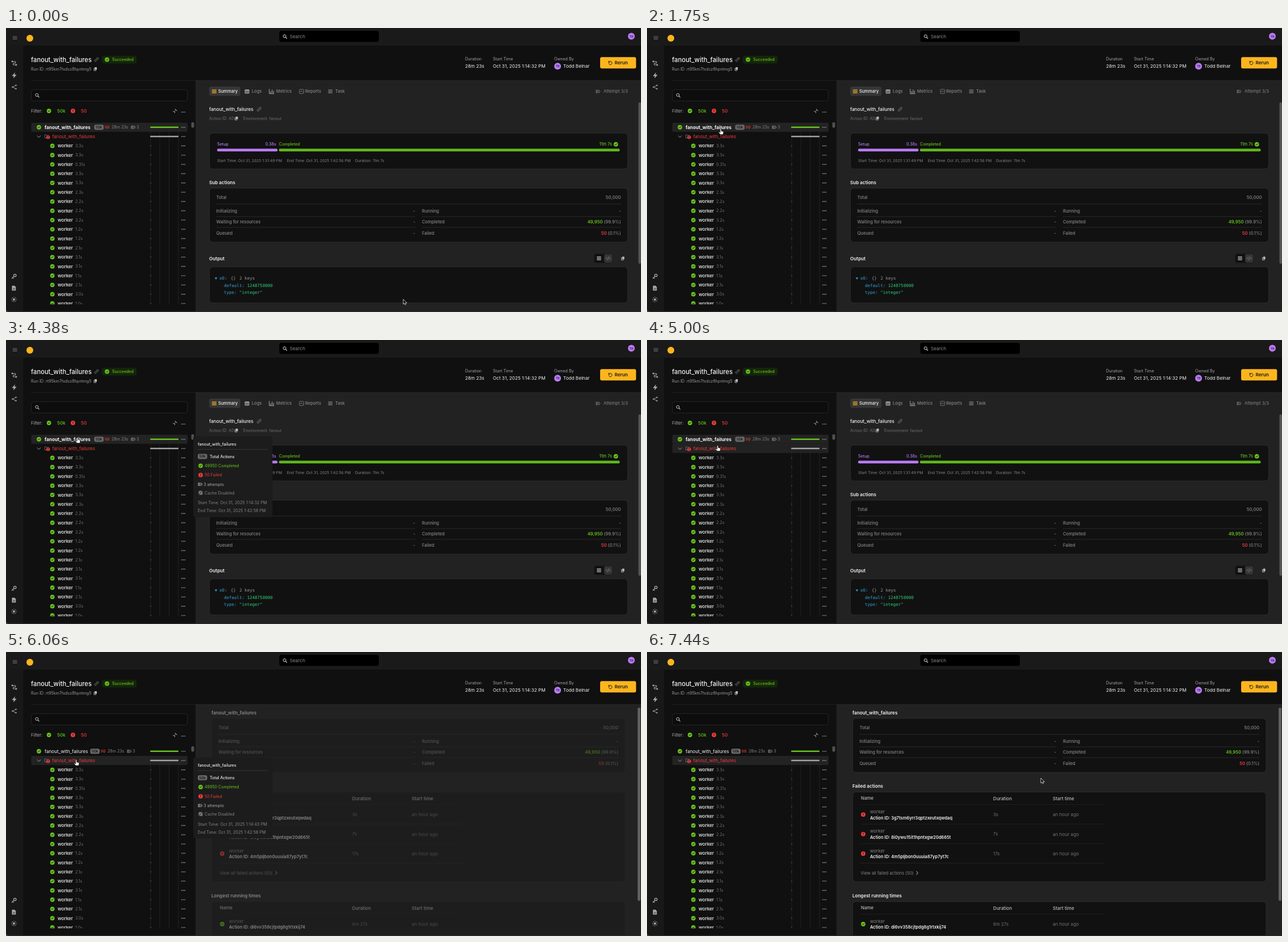
An HTML page that plays this animation: 1119 px wide and 500 px high, repeating every 8 s.

```html
<!DOCTYPE html>
<html lang="en">
<head>
<meta charset="utf-8">
<title>Run details</title>
<style>
html, body { margin: 0; width: 100%; height: 100%; overflow: hidden; background: #101010; }
svg { display: block; width: 100vw; height: 100vh; font-family: Inter, sans-serif; }
.mono { font-family: "DejaVu Sans Mono", monospace; white-space: pre; }
#groupPage .card { opacity: var(--card); }
</style>
</head>
<body>
<svg id="stage" viewBox="0 0 1119 500"></svg>
<script>
const GREEN = '#66c31c', RED = '#ee3b3b', PURPLE = '#b97cf5', YELLOW = '#fdb51e';
const WHITE = '#f2f2f2', GREY = '#858585', DIM = '#707070', LINE = '#303030';
const LOOP = 8000, ROW = 16.33, FIRST_ROW = 207.4;
const rowY = i => FIRST_ROW + ROW * i;

// Drawing helpers; text is placed by its vertical centre
const text = (x, cy, str, size, fill, weight = 400, anchor = 'start', cls = '') =>
  `<text x="${x}" y="${cy + size * 0.36}" font-size="${size}" fill="${fill}" font-weight="${weight}" text-anchor="${anchor}" class="${cls}">${str}</text>`;
const rect = (x, y, x2, y2, fill, r = 0, stroke = 'none', cls = '') =>
  `<rect x="${x}" y="${y}" width="${x2 - x}" height="${y2 - y}" rx="${r}" fill="${fill}" stroke="${stroke}" stroke-width=".8" class="${cls}"/>`;
const circle = (x, y, r, fill) => `<circle cx="${x}" cy="${y}" r="${r}" fill="${fill}"/>`;
const path = (d, stroke, width = 1, fill = 'none') =>
  `<path d="${d}" stroke="${stroke}" stroke-width="${width}" fill="${fill}" stroke-linecap="round" stroke-linejoin="round"/>`;
const line = (x, y, x2, y2, stroke = LINE, width = 0.8) => path(`M${x} ${y}L${x2} ${y2}`, stroke, width);
const at = (x, y, body) => `<g transform="translate(${x} ${y})">${body}</g>`;
const group = (id, body) => `<g id="${id}">${body}</g>`;
const card = (x, y, x2, y2) => rect(x, y, x2, y2, '#111', 6, '#303030', 'card');

// Icons
const check = (x, y, r = 3.9) => circle(x, y, r, GREEN) + at(x, y, path('M-1.6 .1L-.5 1.3L1.7-1.2', '#111', 1));
const alert = (x, y, r = 3.9) => circle(x, y, r, RED) + at(x, y, path('M0-2V.3M0 1.8V1.9', '#111', 1));
const dots = (x, y) => [-2.7, 0, 2.7].map(d => circle(x + d, y, 0.85, '#a5a5a5')).join('');
const lens = (x, y, c) => at(x, y, `<circle cx="-.6" cy="-.6" r="2.5" fill="none" stroke="${c}"/>` + path('M1.3 1.3L3.3 3.3', c, 1.1));
const link = (x, y) => at(x, y, path('M-.6 .6L.9-.9M-.6-1.6L.7-2.9A1.5 1.5 0 0 1 2.9-.7L1.6 .6M.6 1.6L-.7 2.9A1.5 1.5 0 0 1-2.9 .7L-1.6-.6', '#888', 0.9));
const copy = (x, y) => at(x, y, rect(-1.3, -3, 2.6, 1.7, '#bbb', 0.8) + path('M-2.5-1.3V3H1.2', '#bbb', 0.9));
const attempts = (x, y, c = '#999') => at(x, y, path('M-3.5-2.5V2.5M-2-2.5V2.5M-.5-2.5L.8 0L-.5 2.5M1.5-2.5L3.3 0L1.5 2.5', c, 0.9));
const lines3 = (x, y, c, w) => [-2.5, 0, 2.5].map(d => line(x - w, y + d, x + w, y + d, c, 1.3)).join('');
const pill = (x, y) => rect(x, y - 4.4, x + 16.5, y + 4.4, '#6b6b6b', 3) + text(x + 8.2, y, '50k', 6.2, '#161616', 600, 'middle');
const avatar = (x, y, r) => circle(x, y, r, PURPLE) + text(x, y, 'TB', 5.4, '#2a1740', 500, 'middle');

const sidebar = () => rect(0, 0, 30, 500, '#181818') + rect(0, 0, 1119, 31, '#1a1a1a') +
  [-2.2, 0, 2.2].map(d => line(12.2, 17.3 + d, 19.2, 17.3 + d, '#777', 0.9)).join('') + circle(42, 18, 6, YELLOW) +
  rect(481.5, 5, 657, 24.5, '#000', 4) + lens(491.5, 15, '#ddd') + text(500, 15, 'Search', 8.17, '#8c8c8c') +
  avatar(1102, 14.6, 6) +
  at(14.5, 62, path('M-3-3H1.5A1.7 1.7 0 0 1 1.5 0H-1A1.7 1.7 0 0 0-1 3H3', '#aaa', 1.1) + circle(-3.5, -3, 1.4, '#aaa') + circle(3.5, 3, 1.4, '#aaa')) +
  at(14.5, 83.5, path('M1-4.5L-3.7 .8H-.4L-1 4.5L3.7-.9H.4Z', '#aaa', 0.5, '#aaa')) +
  at(14.5, 104, path('M3-3L-3 0L3 3', '#999') + circle(3, -3, 1.3, '#999') + circle(-3, 0, 1.3, '#999') + circle(3, 3, 1.3, '#999')) +
  at(14, 437, `<circle cx="1.7" cy="-1.5" r="2.2" fill="none" stroke="#aaa" stroke-width="1.3"/>` + path('M0 .2L-3.5 3.5M-2.3 2.5L-1 3.7', '#aaa', 1.3)) +
  at(14, 458, path('M-3-4H1L3-2V4H-3Z', '#aaa', 0.6, '#aaa') + path('M-1.4 .3H1.4M-1.4 2.2H1.4', '#222', 0.8)) +
  at(14, 478, circle(0, 0, 2, '#aaa') + Array.from({ length: 8 }, (_, i) => `<g transform="rotate(${i * 45})">${line(0, -3.6, 0, -4.4, '#aaa', 1)}</g>`).join(''));

const header = () => text(44, 56, 'fanout_with_failures', 11.2, WHITE, 500) + link(159.5, 55.5) +
  rect(169, 49, 230, 62.5, '#14260a', 3.5) + check(178, 55.6) + text(187, 55.6, 'Succeeded', 7, GREEN, 500) +
  text(44, 72, 'Run ID: rt95km7fxdcz8hpntmg5', 7.08, '#999') + copy(157.5, 72) +
  text(809, 54.6, 'Duration', 7.25, '#a5a5a5') + text(809, 66.8, '28m 23s', 8.17, WHITE) +
  text(858, 54.6, 'Start Time', 7.25, '#a5a5a5') + text(858, 67, 'Oct 31, 2025 1:14:32 PM', 8.17, WHITE) +
  text(966, 54.6, 'Owned By', 7.1, '#a5a5a5') + avatar(972, 67.3, 6) + text(982, 67, 'Todd Belnar', 8.17, WHITE) +
  rect(1047, 51.2, 1110.3, 71.2, YELLOW, 3) + text(1072.5, 61.3, 'Rerun', 8.17, '#1a1a1a', 600) +
  at(1065, 61.5, path('M-2.7-1.4A3 3 0 1 1-3 .7M-3-3.2V-1.2H-1', '#1a1a1a', 1)) +
  line(44, 92.5, 333, 92.5, '#222');

const actionTree = () => {
  const times = '3.3 3.3 0.31 3.3 3.3 2.3 2.2 2.2 3.2 1.2 1.2 2.1 3.1 3.1 1.1 2.1 3.0 1.0'.split(' ');
  const root = rowY(-2), child = rowY(-1);
  const workers = times.map((s, i) => check(81.7, rowY(i)) + text(91, rowY(i), 'worker', 8.1, WHITE, 500) +
    text(122, rowY(i), s + 's', 7.08, DIM) + line(255, rowY(i) - 1, 255, rowY(i) + 1, '#666', 0.8) + dots(312.5, rowY(i))).join('');
  return rect(44.5, 108.5, 319.5, 128.5, '#0d0d0d', 4, '#2b2b2b') + lens(55, 118.5, '#ccc') +
    text(44, 146, 'Filter:', 7.7, '#aaa') + check(75.7, 146) + text(90, 146, '50k', 8.17, GREEN, 500) +
    alert(118, 146) + text(132, 146, '50', 8.17, RED, 500) +
    at(298, 146, path('M-3.3 .8H-.7V3.4M3.3-.8H.7V-3.4', '#aaa', 1)) + dots(312.5, 148) +
    `<clipPath id="list"><path d="M30 160H334V486.500H30Z"/></clipPath><g clip-path="url(#list)">` +
    group('selected', rect(44.5, -8, 320, 8, '#232323', 2)) +
    group('hover', rect(44.5, -8, 320, 8, 'rgba(255,255,255,.075)', 2)) +
    [255, 271, 287.5, 304].map(x => line(x, 183, x, 487, '#262626')).join('') +
    check(58, root) + group('rootBold', text(68, root, 'fanout_with_failures', 8.17, WHITE, 700)) +
    group('rootPlain', text(68, root, 'fanout_with_failures', 8.17, WHITE)) +
    group('rootInfo', pill(155.5, root) + text(174, root, '50', 6.4, RED, 600) + text(186, root, '28m 23s', 7.08, GREY) +
      attempts(224.5, root) + text(230, root, '3', 7.2, GREY)) +
    rect(254, root - 1.2, 304, root + 1.2, GREEN, 1) + dots(312.5, root) +
    at(58, child, path('M-3-1.3L0 1.6L3-1.3', '#999', 1)) +
    at(72, child, path('M-3.3-3H-1L0-2H3V2.5H-3.3Z', '#777', 0.8)) + alert(74.2, child + 1.3, 3.2) +
    text(81.5, child, 'fanout_with_failures', 8.05, RED) +
    rect(254, child - 1.2, 304, child + 1.2, '#a5a5a5', 1) + dots(312.5, child) + workers + '</g>' +
    rect(326.5, 166, 331.5, 175.5, '#505050', 2);
};

// Totals card, shared by both views
const totals = (x, x2, y) => {
  const cell = (cx, row, label, value) => text(cx, y + 40.5 + row * 19.2, label, 7.65, GREY, 500) + value;
  const right = (cx, row, str) => text(cx, y + 40.5 + row * 19.2, str, 7.7, GREY, 500, 'end');
  const count = (n, share, color) => `<tspan fill="${color}" font-weight="600">${n}</tspan> (${share})`;
  const a = x + 12, b = x2 - 12;
  return card(x, y, x2, y + 95) + text(a, y + 16.5, 'Total', 7.65, GREY, 500) +
    text(b, y + 16.5, '50,000', 7.8, GREY, 500, 'end') + line(a, y + 28, b, y + 28) +
    [50, 69].map(d => line(a, y + d, 721, y + d) + line(733, y + d, b, y + d)).join('') +
    ['Initializing', 'Waiting for resources', 'Queued'].map((s, i) => cell(a, i, s, right(721, i, '-'))).join('') +
    cell(733, 0, 'Running', right(b, 0, '-')) +
    cell(733, 1, 'Completed', right(b, 1, count('49,950', '99.9%', GREEN))) +
    cell(733, 2, 'Failed', right(b, 2, count('50', '0.1%', RED)));
};

const summaryView = () => {
  const tab = (x, s) => text(x, 111.7, s, 7.6, GREY, 500);
  const code = (x, y, s, c) => text(x, y, s, 7.52, c, 400, 'start', 'mono');
  const blue = '#36a3d9', lime = '#2fd17c';
  return rect(358, 103, 413, 119.5, '#363636', 4) + lines3(366.8, 111.7, YELLOW, 3.5) +
    text(374, 111.7, 'Summary', 7.5, WHITE, 500) +
    rect(420.5, 108, 429, 115.5, '#8a8a8a', 1.5) + line(422, 112.5, 427.5, 112.5, '#333', 1) + tab(433, 'Logs') +
    path('M464 108V115.500H472M466.500 112V114M469 109V114M471.500 111V114', GREY, 1.4) + tab(476, 'Metrics') +
    rect(517, 108, 524.5, 115.5, 'none', 1, GREY) + path('M518.500 112.500L520.500 110.500L523 113', GREY) + tab(527, 'Reports') +
    lines3(571.5, 111.7, GREY, 3.3) + tab(580, 'Task') +
    attempts(1043.5, 111.7, GREY) + text(1096, 111.7, 'Attempt 3/3', 7.7, GREY, 400, 'end') +
    text(358, 143, 'fanout_with_failures', 8.17, WHITE, 500) + link(446, 143) +
    text(358, 159.4, 'Action ID: A0', 7.08, DIM) + copy(406, 159) + text(418, 159.4, 'Environment: fanout', 7.08, DIM) +
    card(358.5, 185, 1095.5, 248) +
    text(372, 204.7, 'Setup', 7.1, PURPLE, 500) + text(476, 204.7, '0.38s', 7.1, PURPLE, 500, 'end') +
    text(481, 204.7, 'Completed', 7.05, GREEN, 500) + text(1068, 204.7, '11m 7s', 7.4, GREEN, 500, 'end') + check(1074.7, 204.7) +
    rect(372, 212.5, 478.5, 217.2, PURPLE, 2) + rect(481, 212.5, 1081.5, 217.2, '#5fb81c', 2) +
    text(372, 234, 'Start Time: Oct 31, 2025 1:31:49 PM', 6.8, GREY) +
    text(495, 234, 'End Time: Oct 31, 2025 1:42:56 PM', 6.8, GREY) + text(615, 234, 'Duration: 11m 7s', 6.8, GREY) +
    text(358, 272, 'Sub actions', 8.1, WHITE, 600) + totals(358.5, 1095.5, 282) +
    text(358, 405.7, 'Output', 8.17, WHITE, 600) +
    rect(1036.5, 397.5, 1069, 413.5, '#111', 3) + rect(1054, 398, 1068.5, 413, '#343434', 3) +
    lines3(1045, 405.5, '#aaa', 3.3) + at(1061, 405.5, path('M-2.2-2L-4.2 0L-2.2 2M2.2-2L4.2 0L2.2 2M.8-2.8L-.8 2.8', '#888', 0.9)) + copy(1087, 405.5) +
    card(358.5, 420.5, 1095.5, 484) + path('M368.200 439.500H372L370.100 442.500Z', blue, 0.4, blue) +
    code(376, 440.6, 'o0:', blue) + code(396, 440.6, '{}', '#999') + code(411.5, 440.6, '2 keys', '#999') +
    code(384, 453, `default: <tspan fill="${lime}">1248750000</tspan>`, blue) +
    code(384, 465.3, `type: <tspan fill="${lime}">"integer"</tspan>`, blue) +
    rect(1114.5, 131, 1119, 415, '#555', 2);
};

const groupView = () => {
  const head = y => text(377, y, 'Name', 7.9, '#bbb', 500) + text(610, y, 'Duration', 8.17, '#bbb', 500) +
    text(715, y, 'Start time', 8.17, '#bbb', 500) + line(377, y + 11, 805, y + 11, '#222');
  const item = (y, icon, id, time) => icon(381, y) + text(393, y - 5, 'worker', 7.95, GREY) +
    text(393, y + 5.6, 'Action ID: ' + id, 7.5, WHITE, 600) + text(610, y, time, 7.9, DIM) + text(715, y, 'an hour ago', 8.17, DIM);
  const failed = [['3g7tsm6yrr3qptzxeutxqwdaq', '3s'], ['8i0ywu15it1hpntxgw20d665t', '7s'], ['4m5pljbon0uuuia87yp7yt7c', '17s']];
  return text(362, 106.7, 'fanout_with_failures', 8.17, WHITE, 600) + totals(362.5, 1091, 117) +
    text(362, 236, 'Failed actions', 8.1, WHITE, 600) + card(362.5, 246.5, 1091, 404.5) + head(257.6) +
    failed.map(([id, time], i) => item(286.2 + i * 34.4, alert, id, time) +
      line(377, 303 + i * 34.4, 805, 303 + i * 34.4, '#262626')).join('') +
    text(376.5, 389, 'View all failed actions (50)', 7.5, GREY) + path('M474.700 386.200L477.500 389L474.700 391.800', GREY, 1.1) +
    text(362, 429, 'Longest running times', 8.05, WHITE, 600) + card(362.5, 439.5, 1091, 510) + head(450.6) +
    item(479, check, 'di6vv358cjtpdg8g1rtxkij74', '6m 27s');
};

const tooltip = (id, dy, start) => group(id, at(0, dy,
  rect(330, 169.5, 469.5, 312, '#1c1c1c', 4) + text(338, 183, 'fanout_with_failures', 7.1, WHITE, 500) +
  line(338, 192.5, 461, 192.5, '#3c3c3c') + pill(338, 205) + text(359, 205, 'Total Actions', 7.05, WHITE, 500) +
  check(343, 221.3) + text(350, 221.3, '49950 Completed', 7.1, GREEN) +
  alert(343, 237.7) + text(350, 237.7, '50 Failed', 7.1, RED) +
  attempts(342.5, 254, '#bbb') + text(348, 254, '3 attempts', 7.2, '#aaa') +
  rect(339.5, 265.5, 346.5, 272.5, '#777', 1.5) + line(339.5, 272.5, 346.5, 265.5, '#222', 1) + text(350, 269.2, 'Cache Disabled', 7.1, GREY) +
  text(338, 286.7, `Start Time: Oct 31, 2025 ${start} PM`, 7.25, GREY) +
  text(338, 300.7, 'End Time: Oct 31, 2025 1:42:56 PM', 7.25, GREY)));

const pointers = group('arrow', path('M0 0V8.200L1.900 6.500L3.200 9.300L4.700 8.600L3.400 5.900H6Z', '#eee', 0.8, '#000')) +
  group('hand', path('M-1 .8Q0-.6 1 .8V4L4 4.600Q5.200 5 5 6.500L4.200 10H-.8L-3.600 6.700Q-3.500 5.300-2.200 5.800L-1 6.700Z', '#111', 0.7, '#fff'));

document.getElementById('stage').innerHTML =
  rect(0, 0, 1119, 500, '#101010') + sidebar() + header() + rect(334, 92.5, 1119, 500, '#222') +
  line(334, 92.5, 1119, 92.5, '#2b2b2b') + actionTree() +
  group('summary', summaryView()) +
  group('groupPage', groupView()) + group('groupBar', rect(1113, 98, 1118, 438, '#606060', 2.5)) +
  rect(0, 498.7, 1119, 500, '#2b2b2b') + path('M0 495V500H5Q1 499 0 495Z', 'none', 0, '#24566b') +
  tooltip('tipRoot', 0, '1:14:32') + tooltip('tipChild', ROW, '1:14:43') + group('cursor', pointers);

const el = id => document.getElementById(id);
const show = (id, opacity) => el(id).setAttribute('opacity', +opacity);
const move = (id, x, y) => el(id).setAttribute('transform', `translate(${x} ${y})`);
const ramp = (t, a, b) => Math.min(1, Math.max(0, (t - a) / (b - a)));

// Cursor path: time, x, y
const cursorKeys = [
  [0, 700, 478], [480, 700, 478], [600, 665, 463], [850, 500, 395], [1080, 300, 310], [1250, 195, 268],
  [1440, 153.5, 219.5], [1600, 137, 190], [1780, 128.5, 175], [2000, 126, 171],
  [4360, 126, 171], [5130, 124.2, 188.5], [5310, 123.8, 190],
  [6610, 123.8, 190], [6750, 190, 192], [7050, 500, 207], [7250, 655, 219], [7440, 694, 222.5], [LOOP, 694, 222.5]
];
function cursorAt(t) {
  const i = cursorKeys.findIndex(k => k[0] > t);
  const [a, b] = [cursorKeys[i - 1], cursorKeys[i]], p = ramp(t, a[0], b[0]);
  return [a[1] + (b[1] - a[1]) * p, a[2] + (b[2] - a[2]) * p];
}

function render(t) {
  const [x, y] = cursorAt(t), [hx, hy] = cursorAt(Math.max(0, t - 60));
  move('cursor', x, y);
  show('hand', x < 320);
  show('arrow', x >= 320);

  const opened = t >= 5940;
  move('selected', 0, rowY(opened ? -1 : -2));
  show('rootBold', !opened);
  show('rootPlain', opened);
  move('rootInfo', opened ? -7 : 0, 0);

  // The row highlight trails the cursor; the selected row gets none
  const hoverRow = Math.round((hy - FIRST_ROW) / ROW);
  move('hover', 0, rowY(hoverRow));
  show('hover', hx < 320 && hoverRow !== (opened ? -1 : -2));

  // Cards come in behind their text
  show('summary', !opened);
  show('groupPage', ramp(t, 5940, 6190));
  el('groupPage').style.setProperty('--card', ramp(t, 5940, 6250));
  show('groupBar', opened);

  show('tipRoot', ramp(t, 2390, 2490) - ramp(t, 4860, 4980));
  show('tipChild', ramp(t, 5590, 5690) - ramp(t, 6830, 6950));
}

function tick() {
  render(performance.now() % LOOP);
  requestAnimationFrame(tick);
}
tick();
</script>
</body>
</html>
```
